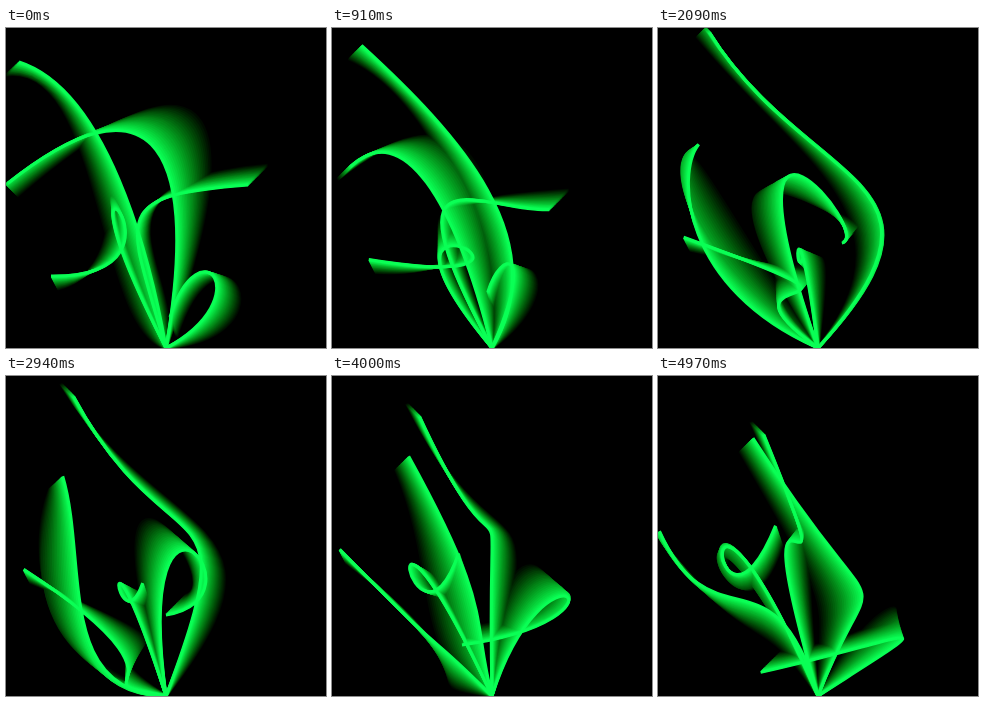
An HTML page with a canvas that plays this animation: 320 by 320 pixels, repeating every 5 s.

```html
<!DOCTYPE html>
<html lang="en">
<head>
<meta charset="utf-8">
<title>Drifting curves</title>
<style>
html, body { margin: 0; width: 100%; height: 100%; overflow: hidden; background: #000; }
canvas { display: block; width: 320px; height: 320px; }
</style>
</head>
<body>
<canvas id="stage" width="320" height="320"></canvas>
<script>
const SIZE = 320, LOOP = 5000, STEPS = 164, TRAIL = 24;
const SPEED = 9.35; // px/s for one unit of velocity
const ctx = document.getElementById('stage').getContext('2d');

// Mirrors a coordinate at the stage walls.
function bounce(v) {
  const m = ((v % (2 * SIZE)) + 2 * SIZE) % (2 * SIZE);
  return SIZE - Math.abs(SIZE - m);
}

// A point that starts at x, y and drifts with constant velocity between the walls.
function drift(x, y, dx, dy) {
  return s => [bounce(x + dx * SPEED * s), bounce(y + dy * SPEED * s)];
}

// Every curve grows from the middle of the floor: root pull, tip pull, tip.
const curves = [
  [drift(150, 262, 9, -6), drift(110, 65, 2, 5), drift(13, 34, 2, -2)],
  [drift(197, 105, -9, 8), drift(137, 48, -8, 5), drift(2, 155, 2, -2)],
  [drift(121, 186, -9, -9), drift(101, 168, 6, 2), drift(242, 157, -3, 3)],
  [drift(24, 56, -3, 9), drift(213, 250, 8, 2.5), drift(45, 248, -1, -2)],
  [drift(254, 269, -6, -6), drift(194, 195, -3, 3), drift(164, 289, -1, -3)]
];

function strokeAll(s) {
  ctx.beginPath();
  for (const points of curves) {
    ctx.moveTo(SIZE / 2, SIZE);
    ctx.bezierCurveTo(...points.flatMap(at => at(s)));
  }
  ctx.stroke();
}

function draw(ms) {
  const step = Math.floor((ms % LOOP) / LOOP * STEPS);
  ctx.fillStyle = '#000';
  ctx.fillRect(0, 0, SIZE, SIZE);
  ctx.lineWidth = 3;
  // Old strokes first, so that newer, brighter ones cover them.
  for (let age = TRAIL; age >= 0; age--) {
    const k = 1 - age / TRAIL;
    ctx.strokeStyle = `rgb(${10 * k * k}, ${255 * k}, ${85 * k * k})`;
    strokeAll((step - age) * LOOP / STEPS / 1000);
  }
}

const start = performance.now();
function tick() {
  draw(performance.now() - start);
  requestAnimationFrame(tick);
}
tick();
</script>
</body>
</html>
```
